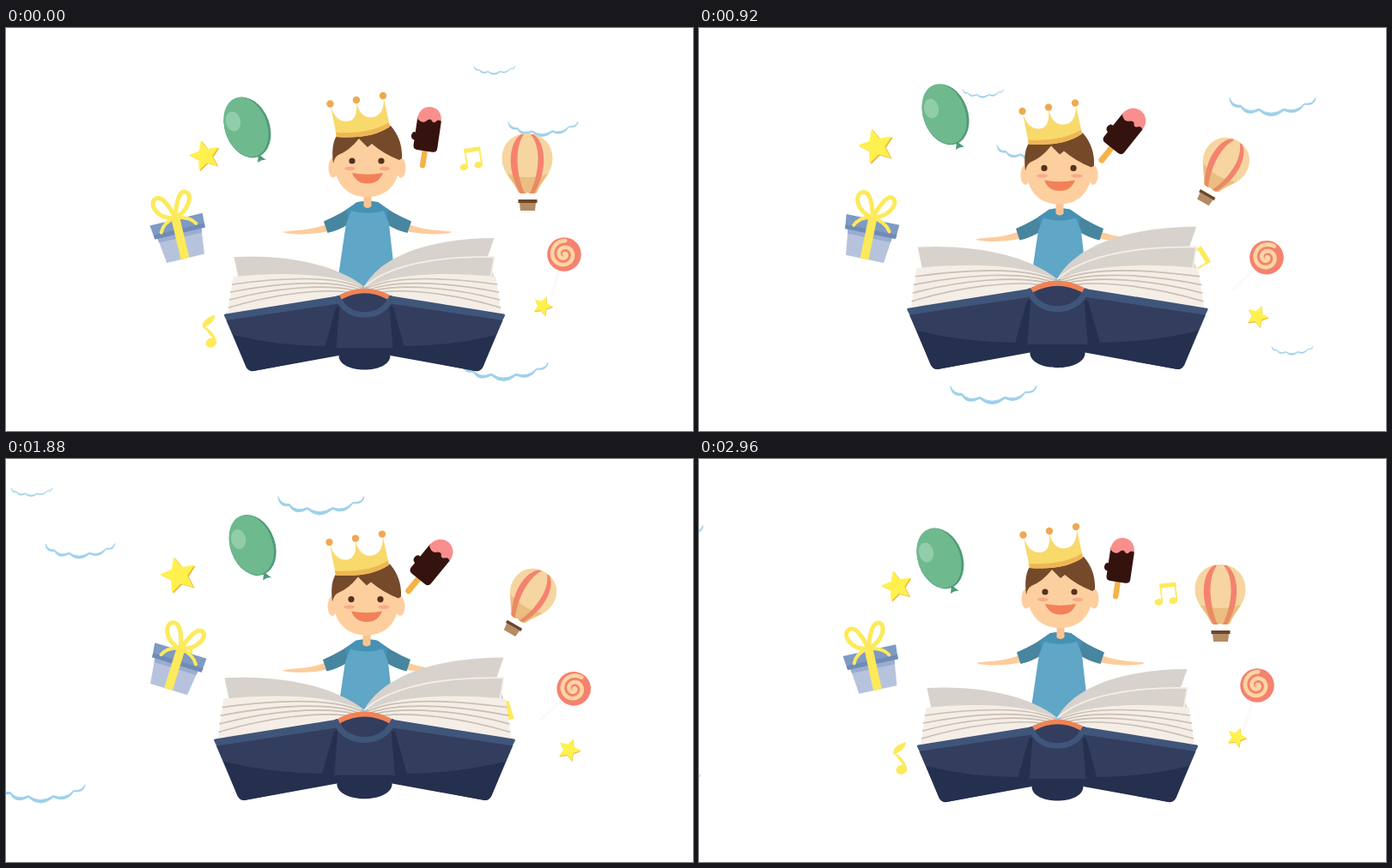
Write an HTML page that moves like this. It is 800 px wide and 470 px high and loops after 3 s.

```html
<!DOCTYPE html>
<html lang="en">
<head>
<meta charset="utf-8">
<title>Storybook</title>
<style>
html, body { margin: 0; width: 100%; height: 100%; overflow: hidden; background: #fff; }
svg { display: block; width: 800px; height: 470px; }
</style>
</head>
<body>
<svg viewBox="0 0 800 470" fill="none" stroke-linejoin="round" stroke-linecap="round">
  <defs>
    <path id="cloud" fill="#9ed0ea" stroke="#9ed0ea" stroke-width=".9" d="M-50-20Q-49-8-37-10Q-31 2-16-6Q-2 7 13-6Q28 1 37-13Q49-11 50-21Q47-13 37-14Q27-3 13-8Q-2 2-16-8Q-29-2-37-12Q-46-11-50-20Z"/>
    <path id="star"/>
    <g id="arm">
      <path fill="#fdcc9b" d="M374 229Q352 236 338 236L324 237.500Q322 240 345 240.500Q362 240 376 237Z"/>
      <path fill="#48859f" d="M409 203Q394 215 370 225.500L374.500 239Q388 236 400 228Z"/>
    </g>
    <g id="block">
      <path fill="#f5eee6" d="M-153 290C-95 284-30 286 0 304L-10 325L-159 332Z"/>
      <g stroke="#cabfb5" stroke-width="1.600">
        <path d="M-154 299C-95 291-35 288-2 304"/>
        <path d="M-156 308C-100 297-40 293-6 305"/>
        <path d="M-157 317C-105 303-45 298-12 306"/>
        <path d="M-158 326C-105 310-50 304-20 308"/>
      </g>
    </g>
    <g id="cover">
      <path fill="#40557a" stroke="#40557a" stroke-width="3" d="M-162 335L-31 314V325L-159 341Z"/>
      <path fill="#333d5e" d="M-161 341L-27 321L-30 381L-129 400Q-135 401-138 395Z"/>
      <path fill="#252f4e" d="M-153 358Q-100 371-46 371L-33 325H-25L-30 382L-129 400Q-135 401-138 395Z"/>
    </g>
  </defs>

  <g id="clouds"></g>
  <g id="noteLeft" fill="#fdea5a">
    <ellipse rx="6.500" ry="5.500" transform="rotate(-15)"/>
    <path stroke="#fdea5a" stroke-width="1.800" d="M5-1Q5-12-6-20Q-5-28 9-30Q6-22-6-20"/>
  </g>
  <g id="noteRight" fill="#fdea5a">
    <ellipse cx="-9" cy="8" rx="4.800" ry="3.800"/>
    <ellipse cx="8" cy="8" rx="4.800" ry="3.800"/>
    <path fill="none" stroke="#fdea5a" stroke-width="1.800" d="M-5 8V-11M12 8V-11"/>
    <path d="M-6-13H13V-8H-6Z"/>
  </g>

  <g id="gift">
    <path fill="#b7c3dd" d="M-26-6H27L23 27H-22Z"/>
    <path fill="#9aadd0" d="M-26-4H27L26 2H-25Z"/>
    <path fill="#7f9ac4" d="M-31-20H32L31-3H-29Z"/>
    <path fill="#6f8bb8" d="M-29.500-8H31.500L31-3H-29Z"/>
    <path fill="#fdea5a" d="M-5-20H5V27H-5Z"/>
    <g stroke="#fdea5a" stroke-width="5" fill="#fff">
      <path d="M-1-22C-22-26-27-46-17-49C-8-51-3-34 0-22C4-36 11-52 18-49C27-45 18-26-1-22"/>
      <path fill="none" stroke-width="4" d="M-1-22Q-15-20-20-9M0-22Q16-20 22-10"/>
    </g>
  </g>

  <g id="balloon">
    <path fill="#4f9b77" d="M294 147L293 157Q298 153 303 154Z"/>
    <ellipse cx="281" cy="116" rx="26" ry="36.500" fill="#4f9b77" transform="rotate(-20 281 116)"/>
    <ellipse cx="279.500" cy="115.500" rx="24.500" ry="36" fill="#6fb98f" transform="rotate(-20 279.500 115.500)"/>
    <ellipse cx="264.500" cy="109" rx="8.500" ry="11.500" fill="#92cdaa" transform="rotate(-12 264.500 109)"/>
  </g>

  <g id="ice">
    <path stroke="#f5b34a" stroke-width="6.500" d="M0 14V33"/>
    <path fill="#34130f" d="M-14-22H14V11Q14 16 9 16H-9Q-14 16-14 11V5Q-19 4-18-1Q-17-5-14-4Z"/>
    <path fill="#f98f8c" d="M-14-20C-14-41 14-41 14-20Q11-24 8-20Q5-16 2-21Q-1-22-4-18Q-8-15-14-20Z"/>
  </g>

  <g id="airship">
    <path fill="#f6d5a0" d="M607 123C625 123 636.500 136 636.500 152C636.500 170 622 180 618 193H597C593 180 577.500 170 577.500 152C577.500 136 589 123 607 123Z"/>
    <path fill="#f4826f" d="M600 124C586 132 582 165 599 193H604C594 170 592 140 603 124ZM614 124C628 132 632 165 615 193H610C621 170 624 140 611 124Z"/>
    <path fill="#d99a50" opacity=".4" d="M584 170Q607 178 631 170C625 179 620 185 618 193H597C595 185 588 178 584 170Z"/>
    <path fill="#fff" d="M596 191.500Q602 195 607 192Q613 195 619 191.500L617 201H598Z"/>
    <path fill="#6c462b" d="M596.500 200H618.500V204H596.500Z"/>
    <path fill="#b48b62" d="M598 204H617L616 213H599Z"/>
  </g>

  <g id="lolly">
    <path stroke="#fafafa" stroke-width="4" d="M644 284L635 314"/>
    <circle cx="650" cy="264" r="19.800" fill="#f4826f"/>
    <path id="swirl" stroke="#fbd5a2" stroke-width="4.600"/>
  </g>

  <g id="starBig"><use href="#star" fill="#efb83e" x=".06" y=".07"/><use href="#star" fill="#fff14d"/></g>
  <g id="starSmall"><use href="#star" fill="#efb83e" x=".06" y=".07"/><use href="#star" fill="#fff14d"/></g>

  <g id="boy">
    <use href="#arm"/>
    <use href="#arm" transform="matrix(-1 0 0 1 842 0)"/>
    <path fill="#4791b3" d="M409 203Q421 200 433 203L446 212L442 230H400L396 212Z"/>
    <path fill="#5fa6c7" d="M402 213Q421 219 440 213L446 228L455 310H384L396 228Z"/>
    <path fill="#fbc391" d="M416.500 193H425.500V208Q421 212 416.500 208Z"/>
    <g fill="#fdcf9f">
      <ellipse cx="381" cy="163" rx="5.500" ry="11.500"/>
      <ellipse cx="460" cy="163" rx="5.500" ry="11.500"/>
      <path d="M382 148C384 122 457 122 458 148C461 176 448 197 420.500 197C393 197 380 176 382 148Z"/>
    </g>
    <path fill="#744a2a" d="M381 158Q377 128 392 119L448 114Q462 130 461 152L458 154Q440 147 426 135L421 139L411 129Q400 143 387 148Q383 150 381 158Z"/>
    <g fill="#57301f"><circle cx="403" cy="155" r="3.600"/><circle cx="437" cy="155" r="3.600"/></g>
    <g fill="#faa888"><ellipse cx="400.500" cy="164" rx="6.500" ry="2.200"/><ellipse cx="441" cy="164" rx="6.500" ry="2.200"/></g>
    <path fill="#f28159" d="M403 169Q421 172.500 439 169Q434 181.500 421 181.500Q408 181.500 403 169Z"/>
    <path fill="#f8d96b" d="M378 91Q384 110 398 109Q410 107 408 87Q413 106 427 104Q440 102 440 82L447 115Q425 130 385 127Z"/>
    <path fill="#efb656" d="M384 122Q424 124 446 110L447 115Q425 130 385 127Z"/>
    <g fill="#f0a94f"><circle cx="377.500" cy="88.500" r="4.200"/><circle cx="408" cy="84" r="4.200"/><circle cx="439" cy="79" r="4.200"/></g>
  </g>

  <g id="book"><g transform="translate(417.500 0)">
    <path fill="#d7d2cc" d="M-152 267C-95 264-35 274 0 302L-147 291Z"/>
    <path fill="#d7d2cc" d="M0 301C22 262 85 245 151 245L143 268L151 290Z"/>
    <path fill="#d7d2cc" stroke="#f5eee6" stroke-width="1.800" d="M0 302C28 276 85 266 151 267L147 291"/>
    <use href="#block"/><use href="#block" transform="scale(-1 1)"/>
    <use href="#cover"/><use href="#cover" transform="scale(-1 1)"/>
    <path fill="#333d5e" d="M-28 311Q0 300 28 311L33 374H-33Z"/>
    <path fill="#252f4e" d="M-32 373H32L30 382C30 404-30 404-30 382Z"/>
    <path stroke="#40557a" stroke-width="6.500" d="M-30 315C-22 341 22 341 30 315"/>
    <path stroke="#f08356" stroke-width="5.500" stroke-linecap="butt" d="M-28 314Q0 299 28 314"/>
  </g></g>
</svg>
<script>
const LOOP = 3000, STEP = 40;
const el = id => document.getElementById(id);
const place = (id, value) => el(id).setAttribute('transform', value);

// x at time 0, lowest y at time 0, size
const clouds = [[569, 60, .48], [625.5, 132, .81], [581, 417, 1], [906, 81, 1], [929, 360, .48]];
const drift = [[0, 0], [320, -77], [920, -238], [1280, -355], [1880, -539], [2320, -651], [3000, -970]];

const polar = (r, a) => `${(r * Math.sin(a)).toFixed(3)} ${(-r * Math.cos(a)).toFixed(3)}`;
el('star').setAttribute('d', 'M' + Array.from({length: 10}, (_, i) => polar(i % 2 ? .47 : 1, i * Math.PI / 5)).join('L') + 'Z');
el('swirl').setAttribute('d', 'M' + Array.from({length: 80}, (_, i) => polar(.5 + i * .195, i * .16)).join('L'));
el('swirl').setAttribute('transform', 'translate(650 264)');
el('clouds').innerHTML = clouds.map((_, i) => `<use id="cloud${i}" href="#cloud"/>`).join('');

function driftAt(t) {
  const i = drift.findIndex(([end]) => end > t);
  const [t0, x0] = drift[i - 1], [t1, x1] = drift[i];
  return x0 + (x1 - x0) * (t - t0) / (t1 - t0);
}

function render(t) {
  const sway = t < 1400 ? t / 1400 : Math.max(0, (2860 - t) / 1460);
  const swing = 1 - Math.abs(t / 1500 - 1);
  const dx = driftAt(t);
  const dy = 4 + 32 * Math.cos((t - 600) * Math.PI / 1000);

  clouds.forEach(([x, y, size], i) => place('cloud' + i, `translate(${x + dx} ${y + dy}) scale(${size})`));

  place('book', `translate(417.5 430) scale(${1 + .108 * sway}) translate(-417.5 -430)`);
  place('boy', `translate(${-1.5 * sway} ${12.8 * sway})`);
  place('balloon', `translate(${9.3 * sway} ${-23 * sway})`);
  place('ice', `translate(${490 + 1.5 * sway} ${127.5 - 1.5 * sway}) rotate(${8.4 + 46 * sway}) scale(${1 + .1 * sway})`);
  place('airship', `translate(608 167) rotate(${45 * sway}) scale(${1 - .13 * sway}) translate(-608 -167)`);
  place('lolly', `rotate(${45 * sway} 648.5 286.7)`);

  place('gift', `translate(200 233) rotate(${-13.5 + 41 * swing}) translate(0 10)`);
  place('starBig', `translate(${231.5 - 41 * swing} ${149 - 18 * swing}) rotate(-15) scale(${18.5 + 4.5 * swing})`);
  place('starSmall', `translate(${625 + 41 * swing} ${324 + 20 * swing}) rotate(22) scale(${11.8 + 2.4 * swing})`);
  place('noteLeft', `translate(${239 - 118 * swing + 105 * swing ** 2} ${367 - 182 * swing}) rotate(${-10 + 50 * swing})`);
  place('noteRight', `translate(${541 + 35 * Math.sin(2.67 * swing)} ${153 + 187 * swing}) rotate(${-9 + 110 * swing}) scale(${1 + .2 * swing})`);
}

function tick() {
  const t = performance.now() % LOOP;
  render(t - t % STEP);
  requestAnimationFrame(tick);
}
tick();
</script>
</body>
</html>
```
